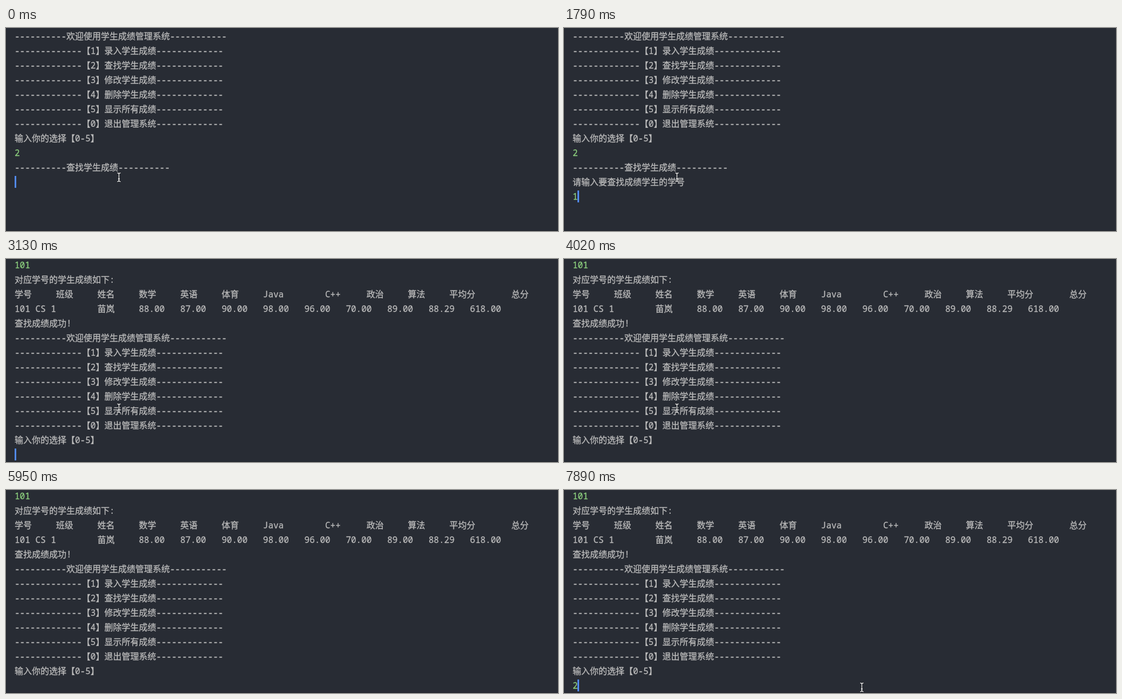
These frames come from a looping animation (1024 by 376 pixels, 8000 ms). An HTML page:

```html
<!DOCTYPE html>
<html lang="zh-CN">
<head>
<meta charset="utf-8">
<title>学生成绩管理系统</title>
<style>
  html, body { margin: 0; width: 100%; height: 100%; overflow: hidden; background: #282c34; }
  #stage { position: relative; width: 1024px; height: 376px; overflow: hidden; }
  #stage::after {
    content: ""; position: absolute; inset: 0;
    border: solid #21252b; border-width: 0 0 1px 1px;
  }
  #page {
    position: absolute; left: 16px; top: 2px; margin: 0; tab-size: 8;
    color: #bbbbbb; -webkit-text-stroke: 0.3px currentColor;
    font: 16px/27px "Noto Sans Mono", "Noto Sans CJK SC", "Noto Sans CJK", monospace;
  }
  .typed { color: #8ccf7e; }
  #caret { position: absolute; width: 3px; height: 22px; background: #528bff; }
  #beam { position: absolute; left: 0; top: 0; }
</style>
</head>
<body>
<div id="stage">
  <pre id="page"></pre>
  <div id="caret"></div>
  <svg id="beam" width="9" height="19" fill="none">
    <defs>
      <path id="ibeam" d="M1.5 1.5Q4.5 1.5 4.5 4V15Q4.5 17.5 1.5 17.5M7.5 1.5Q4.5 1.5 4.5 4M4.5 15Q4.5 17.5 7.5 17.5M3 12.5H6"/>
    </defs>
    <use href="#ibeam" stroke="#15171b" stroke-width="3"/>
    <use href="#ibeam" stroke="#fff" stroke-width="1.3"/>
  </svg>
</div>
<script>
const LOOP = 8000, HEIGHT = 376, ROW = 27, CHAR = 9.6, LEFT = 16;
const STEP = 148.9, LEAD = 10;      // the screen is refreshed once per step
const HOLD = 800, BLINK = 510;      // caret stays on after activity, then blinks
const page = document.getElementById("page");
const caret = document.getElementById("caret");
const beam = document.getElementById("beam");

const dash = n => "-".repeat(n);
const items = ["录入学生成绩", "查找学生成绩", "修改学生成绩", "删除学生成绩", "显示所有成绩", "退出管理系统"];
const menu = [
  dash(10) + "欢迎使用学生成绩管理系统" + dash(11),
  ...items.map((item, i) => `${dash(13)}【${(i + 1) % 6}】${item}${dash(13)}`),
  "输入你的选择【0-5】\n"
].join("\n");

const reply = [
  "对应学号的学生成绩如下:",
  "学号\t班级\t姓名\t数学\t英语\t体育\tJava\t    C++\t    政治\t    算法\t    平均分\t总分",
  "101 CS 1\t苗岚\t88.00\t87.00\t90.00\t98.00\t96.00\t70.00\t89.00\t88.29\t618.00",
  "查找成绩成功!\n"
].join("\n");

// The session: when, what, and whether the user typed it
const START = -260;
const session = [
  [START, menu],
  [START, "2\n", "typed"],
  [START, dash(10) + "查找学生成绩" + dash(10) + "\n"],
  [650, "请输入要查找成绩学生的学号\n"],
  [1750, "1", "typed"],
  [1900, "0", "typed"],
  [2500, "1", "typed"],
  [2800, "\n", "typed"],
  [3100, reply + menu],
  [7850, "2", "typed"]
];

const spans = session.map(([, text, kind = ""]) => {
  const span = document.createElement("span");
  span.className = kind;
  span.textContent = text;
  page.append(span);
  return span;
});

function pointerAt(step) {
  if (step < 29) return [205, 267];
  if (step < 33) {                  // speeds away to the right
    const k = Math.max(0, step - 30);
    return [228 + 105 * k * k, 238 + 107 * Math.max(0, k - 1)];
  }
  if (step < 45) return null;
  const rest = 0.25 ** (step - 45); // comes back and settles
  return [548 + 22 * rest, 356 + 5 * rest];
}

function caretLit(idle) {
  return idle < HOLD || Math.floor((idle - HOLD) / BLINK) % 2 === 1;
}

const show = (el, on) => { el.style.visibility = on ? "visible" : "hidden"; };

function draw(time) {
  const step = Math.floor((time + LEAD) / STEP), t = step * STEP;
  const done = session.filter(([start]) => start <= t);
  spans.forEach((span, i) => { span.style.display = i < done.length ? "" : "none"; });

  const rows = done.map(([, text]) => text).join("").split("\n");
  const scroll = Math.max(0, rows.length * ROW + 2 - HEIGHT);
  page.style.transform = `translateY(${-scroll}px)`;

  caret.style.left = Math.floor(LEFT + CHAR * rows.at(-1).length) + "px";
  caret.style.top = 4 + ROW * (rows.length - 1) - scroll + "px";
  show(caret, caretLit(t - done.at(-1)[0]));

  const spot = pointerAt(step);
  show(beam, spot);
  if (spot) beam.style.transform = `translate(${spot.map(v => Math.round(v) + "px")})`;
}

const begin = performance.now();
function tick() {
  draw((performance.now() - begin) % LOOP);
  requestAnimationFrame(tick);
}
tick();
</script>
</body>
</html>
```
